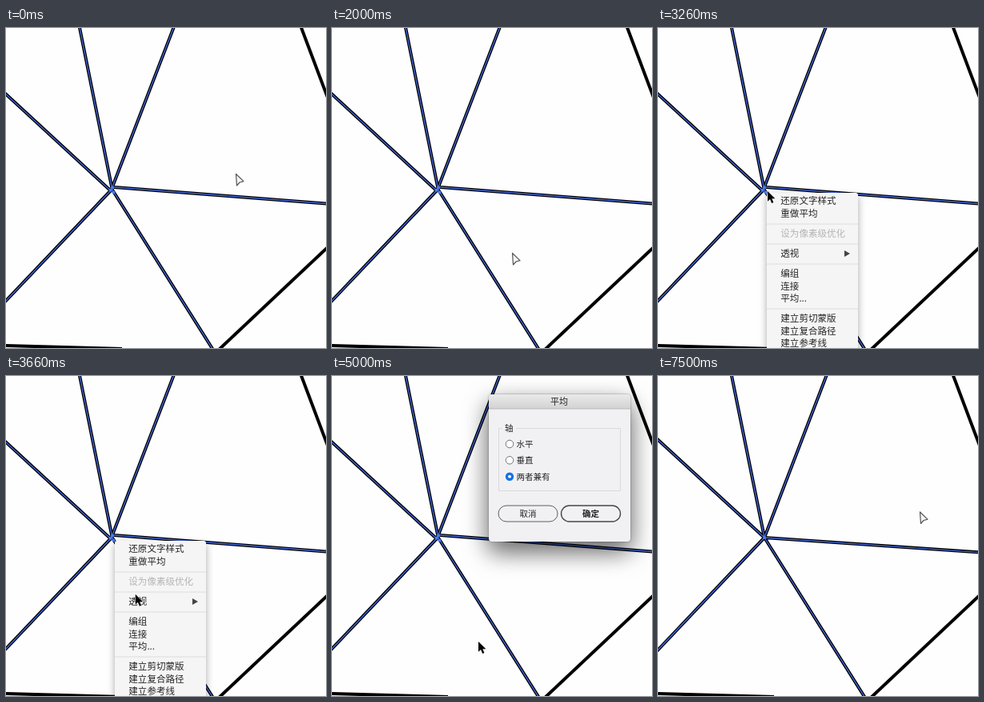
Write an HTML page that moves like this. It is 400 px wide and 400 px high and loops after 8000 ms.

```html
<!DOCTYPE html>
<html lang="zh">
<head>
<meta charset="utf-8">
<style>
html, body { margin: 0; height: 100%; overflow: hidden; background: #fefefe; }
svg { display: block; width: 400px; height: 400px; }
text { font: 11.55px "Noto Sans CJK SC", "Noto Sans CJK", sans-serif; fill: #242424; dominant-baseline: alphabetic; }
.off { fill: #b4b4b4; }
.on { fill: #fff; }
#dialog text { font-size: 10.5px; }
#dialog .title { font-size: 11px; }
.mid { text-anchor: middle; }
#menuBox { filter: drop-shadow(0 4px 5px rgba(0, 0, 0, .34)); }
#dialogBox { filter: drop-shadow(0 12px 15px rgba(0, 0, 0, .5)) drop-shadow(0 0 1px rgba(0, 0, 0, .4)); }
</style>
</head>
<body>
<svg viewBox="0 0 400 400">
  <defs>
    <linearGradient id="bar" x2="0" y2="1">
      <stop stop-color="#eaeaea"/><stop offset="1" stop-color="#d2d2d2"/>
    </linearGradient>
  </defs>
  <path d="M368.5-2L402 87M402 274L264 404M-2 397L145 401" fill="none" stroke="#000" stroke-width="4"/>
  <path id="rays" fill="none" stroke="#000" stroke-width="4"/>
  <g id="selection">
    <path id="core" fill="none" stroke="#4266d9" stroke-width="1.4"/>
    <path id="anchors" fill="#4a7cf0"/>
  </g>
  <rect id="marquee" fill="none" stroke="#777" stroke-width=".8"/>

  <g id="menu">
    <path id="menuBox" d="M136 420V209q0-3 3-3H247q3 0 3 3V420z" fill="#f5f5f5"/>
    <path d="M136 245H250M136 270H250M136 295H250M136 351H250" stroke="#dcdcdc"/>
    <rect id="highlight" x="136" width="114" height="15.6" fill="#3b7ff2"/>
    <g id="items"></g>
    <path id="arrow" d="M233 278l7 4l-7 4z" fill="#444"/>
  </g>

  <g id="dialog">
    <rect id="dialogBox" x="196" y="23" width="177" height="184" rx="4" fill="#f1f1f3"/>
    <path d="M196 41V27q0-4 4-4H369q4 0 4 4V41z" fill="url(#bar)"/>
    <path d="M196 41H373" stroke="#b9b9b9"/>
    <text class="mid title" x="284" y="36">平均</text>
    <path d="M213 65.5H208.5V143.5H360.5V65.5H230" fill="none" stroke="#dadadc"/>
    <text x="216" y="69">轴</text>
    <g fill="#fff" stroke="#747474">
      <circle cx="222" cy="85" r="4.8"/><circle cx="222" cy="105.3" r="4.8"/>
    </g>
    <circle id="radio" cx="222" cy="125.7" r="5.2"/>
    <circle cx="222" cy="125.7" r="1.9" fill="#fff"/>
    <text x="230.5" y="89">水平</text>
    <text x="230.5" y="109.3">垂直</text>
    <text x="230.5" y="129.7">两者兼有</text>
    <rect x="208" y="162" width="74" height="20" rx="10" fill="none" stroke="#606060"/>
    <text class="mid" x="245" y="176">取消</text>
    <rect id="ok" x="286.5" y="162" width="74" height="20" rx="10" stroke="#484848"/>
    <text id="okText" class="mid" x="323.5" y="176" font-weight="bold" style="font-weight:bold">确定</text>
  </g>

  <g id="cursor">
    <path id="tool" d="M.5.5L1.5 15L5 11L10 9.6z" fill="#f4f4f4" stroke="#555" stroke-width="1.2" stroke-linejoin="round"/>
    <path id="pointer" d="M0 0V12.8L3 10L5.2 15L7.4 14L5.3 9.3H9.4z" fill="#000" stroke="#fff" stroke-width="1" paint-order="stroke"/>
  </g>
</svg>
<script>
const $ = id => document.getElementById(id);
const set = (id, attrs) => { for (const k in attrs) $(id).setAttribute(k, attrs[k]); };
const show = (id, opacity) => set(id, { opacity: +opacity });
const clamp = v => Math.min(1, Math.max(0, v));
const ramp = (t, a, b) => clamp((t - a) / (b - a));
const between = (t, a, b) => t >= a && t < b;

// Each ray: outer end, then inner end
const scattered = [[91.5, -3, 133, 203], [210.5, -3, 132.5, 200], [-2, 81, 132, 204.5],
  [-2, 343, 132.5, 201.5], [132, 198.8, 402, 219.7], [260, 404, 131.5, 200]];
const joined = [[91.5, -3], [211.5, -3], [-2, 78], [-2, 344.5], [402, 220.5], [260, 404]]
  .map(p => [...p, 133, 202]);
const path = rays => rays.map(([a, b, c, d]) => `M${a} ${b}L${c} ${d}`).join('');
const square = (x, y) => `M${x - 1.8} ${y - 1.8}h3.6v3.6h-3.6z`;
const spread = square(133, 199.5) + square(130.5, 202.5) + square(134.5, 205.5);

const items = [['还原文字样式', 216], ['重做平均', 231.7], ['设为像素级优化', 257], ['透视', 282], ['编组', 307],
  ['连接', 322.5], ['平均...', 338], ['建立剪切蒙版', 363], ['建立复合路径', 378.5], ['建立参考线', 394]];
$('items').innerHTML = items.map(([s, y]) => `<text x="153.3" y="${y + 4.2}">${s}</text>`).join('');
const labels = [...$('items').children];
const disabled = 2;

// time, x, y
const track = [[0, 287, 182], [230, 287, 182], [1030, 54, 78], [1060, 54, 78], [1130, 51, 78], [1260, 43, 78],
  [1460, 43, 78], [1950, 225, 281], [2030, 225, 281], [2260, 150, 212], [2330, 150, 212], [2530, 132, 190],
  [2700, 134, 200], [3240, 134, 200], [3260, 137, 204], [3330, 137, 204], [3960, 183, 332], [5330, 183, 332],
  [6100, 327, 169.5], [8000, 327, 169.5]];

function cursorAt(t) {
  const i = track.findIndex((k, n) => n && t <= k[0]);
  const [a, x, y] = track[i - 1], [b, X, Y] = track[i];
  const u = ramp(t, a, b), e = u * u * (3 - 2 * u);
  return [x + (X - x) * e, y + (Y - y) * e];
}

function draw(t) {
  const [x, y] = cursorAt(t);
  const merged = t >= 7230;
  const d = path(merged ? joined : scattered);
  set('rays', { d });
  set('core', { d });
  set('anchors', { d: merged ? square(133, 202) : spread });
  show('selection', !between(t, 1000, 1950));

  show('marquee', between(t, 1480, 1950));
  set('marquee', { x: 43, y: 78, width: x - 43, height: y - 78 });

  const menu = t < 2770 ? 0 : 1 - ramp(t, 4720, 4880);
  show('menu', menu);
  const blink = between(t, 4560, 4660);
  const row = blink ? -1 : items.findIndex(([, c], i) => i !== disabled && Math.abs(y - c) < 7.8);
  show('highlight', row >= 0);
  if (row >= 0) set('highlight', { y: items[row][1] - 7.8 });
  labels.forEach((el, i) => el.setAttribute('class', i === row ? 'on' : i === disabled ? 'off' : ''));
  set('arrow', { fill: row === 3 ? '#fff' : '#444' });

  const dialog = ramp(t, 4880, 4980) * (1 - ramp(t, 7160, 7300));
  show('dialog', dialog);
  const pressed = t >= 7000, hover = x > 288 && y < 182;
  set('radio', { fill: pressed ? '#6e6e6e' : '#1470e6' });
  set('ok', { fill: pressed ? '#303030' : hover ? '#484848' : '#f1f1f3', 'stroke-width': 1.4 });
  set('okText', { class: hover ? 'mid on' : 'mid' });

  const system = between(t, 2770, 7300);
  show('pointer', system);
  show('tool', !system);
  set('cursor', { transform: `translate(${x} ${y})` });
}

function frame() {
  draw(performance.now() % 8000);
  requestAnimationFrame(frame);
}
frame();
</script>
</body>
</html>
```
